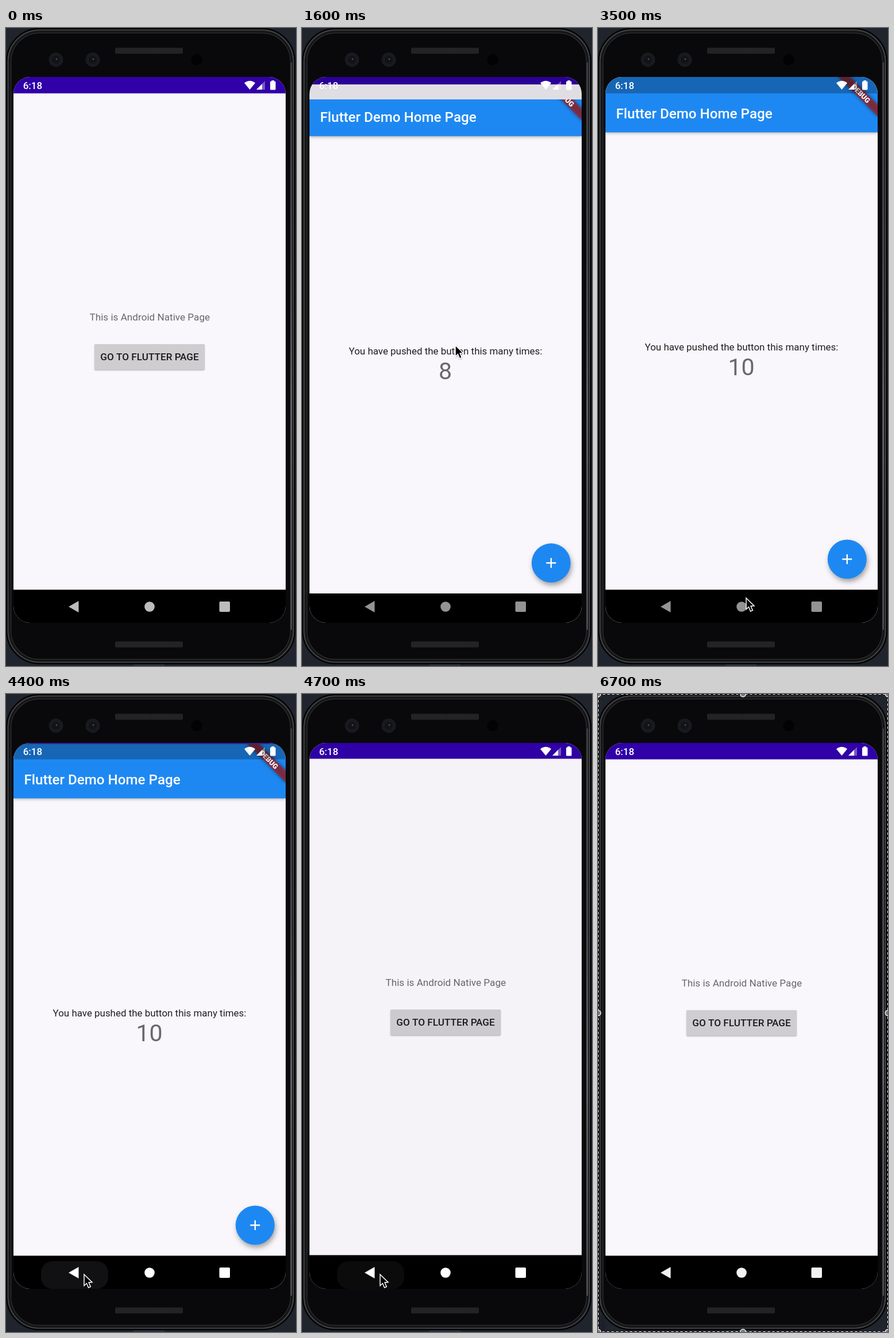
Write an HTML page with a canvas that moves like this. It is 505 px wide and 1108 px high and loops after 6.8 s.

```html
<!DOCTYPE html>
<html lang="en">
<head>
<meta charset="utf-8">
<title>Page transition</title>
<style>
html, body { margin: 0; width: 100%; height: 100%; overflow: hidden; background: #20242c; }
canvas { display: block; }
</style>
</head>
<body>
<canvas id="stage" width="505" height="1108"></canvas>
<script>
const ctx = document.getElementById('stage').getContext('2d');
const LOOP = 6800, STEP = 100;
const OPEN = 1366, CLOSE = 4394, SLIDE = 425;
const LEFT = 13, TOP = 85, WIDTH = 474, HEIGHT = 948;
const BAR = 113.5, NAV = 975.5;
const BLUE = '#1e88f2', PAPER = '#f9f7fb';

const clamp = x => Math.min(1, Math.max(0, x));
const mix = (a, b, k) => a + (b - a) * k;
const smooth = k => k * k * (3 - 2 * k);

// Cubic bezier (.4, 0, .2, 1)
function fastOutSlowIn(x) {
  let lo = 0, hi = 1;
  for (let i = 0; i < 24; i++) {
    const s = (lo + hi) / 2, r = 1 - s;
    if (1.2 * r * r * s + 0.6 * r * s * s + s ** 3 < x) lo = s; else hi = s;
  }
  return smooth(lo);
}

function rect(x, y, w, h, color, r = 0) {
  ctx.fillStyle = color;
  ctx.beginPath();
  ctx.roundRect(x, y, w, h, r);
  ctx.fill();
}

function circle(x, y, r, color) {
  ctx.fillStyle = color;
  ctx.beginPath();
  ctx.arc(x, y, r, 0, 7);
  ctx.fill();
}

function poly(points, color) {
  ctx.fillStyle = color;
  ctx.beginPath();
  points.forEach(([x, y]) => ctx.lineTo(x, y));
  ctx.closePath();
  ctx.fill();
}

function text(str, x, y, size, color, weight = 400, align = 'center') {
  ctx.font = `${weight} ${size}px Roboto, sans-serif`;
  ctx.textAlign = align;
  ctx.fillStyle = color;
  ctx.fillText(str, x, y);
}

function layer(draw) {
  ctx.save();
  draw();
  ctx.restore();
}

function shadowed(blur, dy, alpha, draw, dx = 0) {
  layer(() => {
    ctx.shadowColor = `rgba(0,0,0,${alpha})`;
    ctx.shadowBlur = blur;
    ctx.shadowOffsetX = dx;
    ctx.shadowOffsetY = dy;
    draw();
  });
}

function rim(inset, color, width) {
  ctx.strokeStyle = color;
  ctx.lineWidth = width;
  ctx.beginPath();
  ctx.roundRect(inset, inset, 504 - 2 * inset, 1105 - 2 * inset, 58 - inset);
  ctx.stroke();
}

function speaker(y) {
  rect(190, y, 118, 11, '#1b1b1c', 2);
  for (let x = 191; x < 308; x += 2.5) rect(x, y + 1, 1, 9, '#303031');
}

function lens(x) {
  circle(x, 55, 12.5, '#191a1f');
  circle(x, 55, 7, '#121317');
  circle(x + 1, 54, 1.3, '#55575c');
}

function phone() {
  rect(0, 0, 505, 1108, '#20242c');
  rect(222, 1104, 54, 4, '#2a3342');
  rect(0, 0, 504, 1105, '#09090b', 58);
  rim(1, '#050506', 2);
  rim(3.5, '#505255', 1.6);
  rim(5.5, '#1d1e20', 2);
  rim(8.5, '#313235', 1.4);
  const shine = ctx.createLinearGradient(0, 50, 0, 1060);
  shine.addColorStop(0, '#3c3d40');
  shine.addColorStop(0.35, '#4a4b4e');
  shine.addColorStop(0.6, '#66686b');
  shine.addColorStop(1, '#4a4b4e');
  rect(495.5, 60, 2.5, 985, shine);
  speaker(34);
  speaker(1065);
  lens(87);
  lens(151);
  circle(332, 55, 9.5, '#020203');
}

function nativePage(dy, dim) {
  layer(() => {
    ctx.translate(0, dy);
    rect(LEFT, TOP - 30, WIDTH, HEIGHT + 60, PAPER);
    rect(LEFT, TOP, WIDTH, BAR - TOP, '#3000a8');
    text('This is Android Native Page', 250.3, 508, 17.15, '#69676b');
    shadowed(2, 1, 0.3, () => rect(154, 549, 192, 44.5, '#cfcdd0', 2));
    text('GO TO FLUTTER PAGE', 250, 577.3, 17.15, '#1a191c', 500);
    rect(LEFT, NAV, WIDTH, 90, '#000');
  });
  rect(LEFT, TOP, WIDTH, HEIGHT, `rgba(0,0,0,${dim})`);
}

function banner() {
  layer(() => {
    ctx.translate(LEFT + WIDTH, TOP);
    ctx.rotate(Math.PI / 4);
    layer(() => {
      ctx.filter = 'blur(3px)';
      rect(-49, 33.9, 98, 14.5, 'rgba(0,0,0,.5)');
    });
    rect(-49, 33.9, 98, 14.5, 'rgba(183,28,28,.63)');
    text('DEBUG', 0, 45.5, 12.3, '#fff', 900);
  });
}

function addButton(t) {
  const x = 433.8, y = 922.5;
  shadowed(9, 5, 0.35, () => circle(x, y, 34, BLUE), 2);
  for (const tap of [2300, 2700]) {
    const k = (t - tap) / 400;
    if (k > 0 && k < 1) circle(x, y, mix(14, 34, clamp(k * 2)), `rgba(255,255,255,${0.22 * (1 - k)})`);
  }
  rect(x - 8.5, y - 1.2, 17, 2.4, '#fff');
  rect(x - 1.2, y - 8.5, 2.4, 17, '#fff');
}

// The window is revealed below a clip edge while it slides.
function flutterPage(t, dy, hidden) {
  layer(() => {
    ctx.translate(0, dy);
    ctx.beginPath();
    ctx.rect(LEFT, TOP + HEIGHT * hidden, WIDTH, HEIGHT + 40);
    ctx.clip();
    rect(LEFT, TOP, WIDTH, HEIGHT, PAPER);
    shadowed(5, 2, 0.3, () => rect(LEFT, TOP, WIDTH, 181.3 - TOP, BLUE));
    text('Flutter Demo Home Page', 31.5, 156.5, 24.18, '#fff', 500, 'left');
    text('You have pushed the button this many times:', 250, 560, 16.93, '#1f1e20');
    text(t < 2400 ? 8 : t < 2800 ? 9 : 10, 249.5, 603, 41.1, '#69686b');
    addButton(t);
    banner();
    rect(LEFT, TOP, WIDTH, BAR - TOP, 'rgba(0,0,0,.25)');
    rect(LEFT, NAV, WIDTH, 90, '#000');
  });
}

function closing(t) {
  const p = fastOutSlowIn(clamp((t - CLOSE) / SLIDE));
  flutterPage(t, 39 * p, 1 - (1 - p) ** 5);
}

function pages(t) {
  if (t < CLOSE) {
    const k = clamp((t - OPEN) / SLIDE), p = fastOutSlowIn(k);
    nativePage(-18.6 * p, 0.1 * clamp(k * 2));
    if (k > 0) flutterPage(t, 39 * (1 - p), (1 - p) ** 1.89);
    return;
  }
  const k = clamp((t - CLOSE) / SLIDE), p = fastOutSlowIn(k);
  nativePage(-18.6 * (1 - p), 0.1 * (1 - clamp((k - 0.3) / 0.5)));
  if (k === 1) return;
  layer(() => {
    ctx.globalAlpha = 0.09;
    closing(t - 36);
  });
  closing(t);
}

function statusIcons() {
  text('6:18', 29.7, 106, 16.93, '#fff', 500, 'left');
  ctx.fillStyle = '#fff';
  ctx.beginPath();
  ctx.moveTo(424.5, 107);
  ctx.lineTo(415, 95.5);
  ctx.quadraticCurveTo(424.5, 88, 434, 95.5);
  ctx.fill();
  poly([[436, 107], [451, 107], [451, 92]], 'rgba(255,255,255,.35)');
  poly([[436, 107], [446, 107], [446, 97]], '#fff');
  rect(460, 92.5, 9.5, 15, '#fff', 1.5);
  rect(462.5, 91, 4.5, 3, '#fff');
}

function navIcons(t) {
  const press = t < 4300 ? 0 : 1 - clamp((t - 4600) / 300);
  if (press) rect(61, 985, 117, 48, `rgba(17,17,19,${press})`, 20);
  const shade = t < 4300
    ? mix(188, 147, clamp(t / 1250))
    : mix(255, 242, clamp((t - 6000) / 300));
  const color = `rgb(${shade},${shade},${shade})`;
  poly([[126.5, 995], [126.5, 1015], [109, 1005]], color);
  circle(250, 1005, 8.8, color);
  rect(371.5, 996, 18.5, 18, color, 2);
}

// Each stop: time, x, y
const PATH = [
  [300, 500, 1085], [1200, 267, 551], [1600, 267, 551], [2200, 434, 923],
  [2900, 434, 923], [3500, 258, 990], [4200, 136, 1008], [4900, 136, 1008], [5400, 502, 1090]
];
const ARROW = [[0, 0], [0, 19.5], [4.4, 15.5], [7.6, 23], [11.3, 21.4], [8.1, 14], [14, 13.6]];

function cursor(t) {
  const i = PATH.findIndex(stop => stop[0] > t);
  if (i < 1) return;
  const [t0, x0, y0] = PATH[i - 1], [t1, x1, y1] = PATH[i];
  const k = smooth((t - t0) / (t1 - t0));
  layer(() => {
    ctx.translate(mix(x0, x1, k), mix(y0, y1, k));
    shadowed(3, 1.5, 0.4, () => poly(ARROW, '#000'));
    ctx.strokeStyle = '#fff';
    ctx.lineWidth = 1.5;
    ctx.stroke();
  });
}

function selection() {
  rect(0, 1080, 12, 28, '#1c2027');
  layer(() => {
    ctx.lineWidth = 1;
    ctx.strokeStyle = '#111';
    ctx.strokeRect(0.5, 0.5, 504, 1107);
    ctx.setLineDash([4, 4]);
    ctx.strokeStyle = '#fff';
    ctx.strokeRect(0.5, 0.5, 504, 1107);
  });
  for (const x of [0, 252.5, 505]) for (const y of [0, 554, 1108]) {
    if (x === 252.5 && y === 554) continue;
    circle(x, y, 5.5, '#f2f2f2');
    circle(x, y, 4, '#77797d');
  }
}

function frame() {
  // A small lead makes up for display latency.
  const t = Math.floor((performance.now() + 16) / STEP) * STEP % LOOP;
  phone();
  layer(() => {
    ctx.beginPath();
    ctx.roundRect(LEFT, TOP, WIDTH, HEIGHT, 29);
    ctx.clip();
    pages(t);
    statusIcons();
    navIcons(t);
  });
  cursor(t);
  if (t >= 5700) selection();
  requestAnimationFrame(frame);
}
frame();
</script>
</body>
</html>
```
